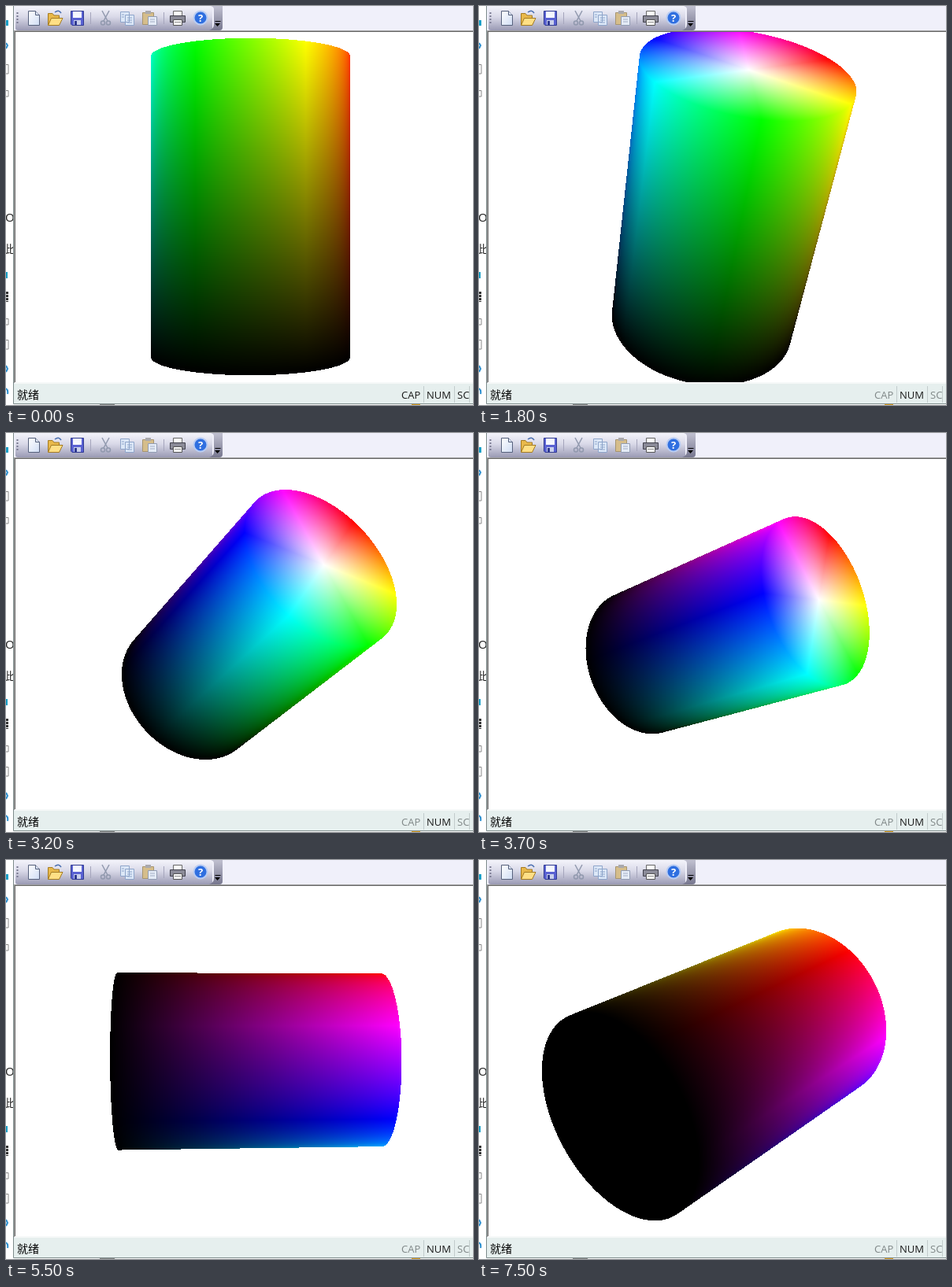
Recreate the animation shown at these times as an HTML page with a canvas. Size 593 by 507 pixels, loop 7.7 s.

```html
<!DOCTYPE html>
<html lang="zh">
<head>
<meta charset="utf-8">
<style>
  html, body { margin: 0; width: 100%; height: 100%; overflow: hidden; background: #fff; }
  svg, canvas { position: absolute; display: block; left: 0; top: 0; }
  canvas { left: 12px; top: 33px; }
  text { font: 13px "Open Sans", "Noto Sans CJK SC", "Noto Sans CJK", sans-serif; }
</style>
</head>
<body>
<svg width="593" height="507" viewBox="0 0 593 507">
  <defs>
    <linearGradient id="bar" x2="0" y2="1">
      <stop stop-color="#f4f4fb"/><stop offset=".45" stop-color="#d9d9e8"/><stop offset="1" stop-color="#9a9ab4"/>
    </linearGradient>
    <linearGradient id="end" x2="0" y2="1">
      <stop stop-color="#c0c0d0"/><stop offset="1" stop-color="#77778f"/>
    </linearGradient>
    <linearGradient id="page" x2="1" y2="1">
      <stop stop-color="#fff"/><stop offset="1" stop-color="#cfdcf4"/>
    </linearGradient>
  </defs>

  <!-- window behind, on the left -->
  <g fill="none" stroke="#8a8a8a">
    <path d="M-2 74.500H3V86H-2M-2 107.500H3V115H-2M-2 397.500H3V405H-2M-2 424.500H3V436H-2"/>
    <path d="M1.500 363V376" stroke="#333" stroke-width="3" stroke-dasharray="3 1"/>
    <path d="M0 47L2 50L0 54M0 457L2 461L0 465M0 486Q3 488 2 493" stroke="#2b8fd0" stroke-width="2"/>
  </g>
  <path d="M0 18H3V25H0ZM0 338H2V346H0Z" fill="#18a0c8"/>
  <text x="-1" y="274" style="font-size:15px" fill="#222">O</text>
  <text x="-3" y="314" style="font-size:14px" fill="#222">此</text>
  <path d="M119 506H138V507H119Z" fill="#888"/>
  <path d="M515 506H526V507H515Z" fill="#e0a020"/>

  <!-- window frame and toolbar -->
  <path d="M9 0H593V506H9Z" fill="#f0f0fa"/>
  <path d="M12 0H262V31H15Q12 31 12 28Z" fill="url(#bar)"/>
  <path d="M260 0H275V27Q275 31 271 31H258Q264 29 264 23V4Q264 1 260 0Z" fill="url(#end)"/>
  <path d="M265.500 19.500H272.500" stroke="#000"/>
  <path d="M265 22H272L268.500 26Z"/>
  <path d="M14.500 8V24" stroke="#77778f" stroke-width="2" stroke-dasharray="2 2"/>
  <path d="M107.500 8V23M200.500 8V23" stroke="#a5a5bc"/>

  <g>
    <path d="M28.500 6.500H37.500L42.500 11.500V24.500H28.500Z" fill="url(#page)" stroke="#56617c"/>
    <path d="M37.500 6.500V11.500H42.500" fill="#dce4f4" stroke="#56617c"/>
    <path d="M53.500 24V9.500H59L61 12H67.500V24Z" fill="#e9b94b" stroke="#a47b22"/>
    <path d="M53.500 24.500L57.500 15.500H72L67.500 24.500Z" fill="#ffdf85" stroke="#a47b22"/>
    <path d="M62 8Q67 4 70 9" fill="none" stroke="#4a6fb0" stroke-width="1.500"/>
    <path d="M82.500 6.500H98.500V24.500H84L82.500 23Z" fill="#5961d2" stroke="#303a91"/>
    <path d="M85 7H96V15H85Z" fill="#f5f7ff"/>
    <path d="M86 18H95V24H86Z" fill="#c9d0ec"/><path d="M87 19H90V24H87Z" fill="#303a91"/>
    <g fill="none" stroke="#9199ae" stroke-width="1.500">
      <path d="M122 6L129 19M131 6L124 19"/><circle cx="123" cy="21.500" r="2.500"/><circle cx="130" cy="21.500" r="2.500"/>
    </g>
    <path d="M145.500 7.500H156.500V20.500H145.500ZM151.500 11.500H162.500V24.500H151.500Z" fill="#dce7f7" stroke="#8ea5ca"/>
    <path d="M147 11H150M147 14H150M154 15H160M154 18H160M154 21H160" stroke="#8ea5ca"/>
    <path d="M173.500 8.500H187.500V23.500H173.500Z" fill="#d5bd8b" stroke="#a69570"/>
    <path d="M177 6H184V10H177Z" fill="#aaa9ad"/>
    <path d="M180.500 13.500H191.500V24.500H180.500Z" fill="#e4ebf6" stroke="#929db4"/>
    <path d="M183 17H189M183 20H189" stroke="#a3aec5"/>
    <path d="M212.500 6.500H223.500V13H212.500Z" fill="#fff" stroke="#666"/>
    <path d="M208.500 12.500H227.500V20.500H208.500Z" fill="#8b8b98" stroke="#40404c"/>
    <path d="M212.500 17.500H223.500V24.500H212.500Z" fill="#fff" stroke="#555"/>
    <path d="M214 20.500H222" stroke="#888"/>
    <circle cx="247" cy="15" r="8.500" fill="#2f6fe0" stroke="#b8ccf3" stroke-width="2"/>
  </g>
  <text x="247" y="20" text-anchor="middle" style="font-weight:700" fill="#fff">?</text>

  <!-- view and status bar -->
  <path d="M10 31H593V479H10Z" fill="#a0a0a0"/>
  <path d="M11 32H593V479H11Z" fill="#696969"/>
  <path d="M12 33H593V478H12Z" fill="#fff"/>
  <path d="M11 478H593V480H11Z" fill="#f6f8f8"/>
  <path d="M10 480H593V505H10Z" fill="#e6efee"/>
  <path d="M530.500 483V504M569.500 483V504M588.500 483V504" stroke="#c2cccc"/>
  <path d="M9.500 0V505.500H593" fill="none" stroke="#7d8b8b"/>
  <text x="14" y="499" style="font-size:14px">就绪</text>
  <g fill="#1a1a1a">
    <text class="key" x="502" y="499">CAP</text>
    <text x="534" y="499">NUM</text>
    <svg x="570" y="480" width="18" height="25"><text class="key" x="3" y="19">SC</text></svg>
  </g>
</svg>
<canvas width="581" height="445"></canvas>
<script>
const LOOP = 7700, FOCAL = 1037, HALF = 1.5, CX = 298.5, CY = 222, RAD = Math.PI / 180;
const canvas = document.querySelector('canvas'), ctx = canvas.getContext('2d');
const { width, height } = canvas;
const lockKeys = document.querySelectorAll('.key');

// Key poses: time, clockwise roll, tilt towards the viewer, camera distance, hue facing the viewer
const poses = [
  [200, 0, 0, 8.26, 90],
  [1800, 10.5, 32, 8.26, 130],
  [2500, 23.4, 43.5, 9.35, 150],
  [3700, 70.5, 39.8, 10.25, 225],
  [4500, 87.7, 21.5, 11.3, 252],
  [5500, 89.7, -4.3, 9.37, 279],
  [7500, 61.6, -42.8, 8.27, 337]
];

const dot = (a, b) => a[0] * b[0] + a[1] * b[1] + a[2] * b[2];
const unit = a => a.map(v => v / Math.hypot(...a));
const cross = (a, b) => [0, 1, 2].map(i => {
  const j = (i + 1) % 3, k = (i + 2) % 3;
  return a[j] * b[k] - a[k] * b[j];
});

// Smooth curve through the key poses, at rest at both ends.
function poseAt(time) {
  const last = poses.length - 1;
  const t = Math.min(poses[last][0], Math.max(poses[0][0], time));
  const i = Math.max(1, poses.findIndex(p => p[0] >= t));
  const a = poses[i - 1], b = poses[i], span = b[0] - a[0], s = (t - a[0]) / span;
  const slope = (j, n) => j === 0 || j === last ? 0
    : (poses[j + 1][n] - poses[j - 1][n]) / (poses[j + 1][0] - poses[j - 1][0]);
  const [roll, tilt, dist, hue] = [1, 2, 3, 4].map(n =>
    a[n] + (b[n] - a[n]) * s * s * (3 - 2 * s)
    + span * s * (1 - s) * (slope(i - 1, n) * (1 - s) - slope(i, n) * s));
  const flat = Math.cos(tilt * RAD);
  const axis = [Math.sin(roll * RAD) * flat, Math.cos(roll * RAD) * flat, Math.sin(tilt * RAD)];
  return { axis, dist, hue };
}

const channel = (hue, shift) => {
  const h = (((hue + shift) / 60) % 6 + 6) % 6;
  return Math.min(1, Math.max(0, Math.abs(h - 3) - 1));
};

// Casts one ray per pixel at the HSV cylinder.
function render({ axis, dist, hue }) {
  const image = ctx.createImageData(width, height), data = image.data;
  const front = unit([0, 1, 2].map(i => (i === 2) - axis[2] * axis[i]));
  const side = cross(axis, front);
  const eyeH = dist * axis[2], c = dist * dist - eyeH * eyeH - 1;

  for (let y = 0, i = 0; y < height; y++) {
    for (let x = 0; x < width; x++, i += 4) {
      const ray = [(x + .5 - CX) / FOCAL, (CY - y - .5) / FOCAL, -1];
      const k = dot(ray, axis), a = dot(ray, ray) - k * k, b = -dist - eyeH * k;
      const disc = b * b - a * c;
      if (disc < 0) continue;

      let t = (-b - Math.sqrt(disc)) / a, h = eyeH + t * k, sat = 1;
      const onCap = Math.abs(h) > HALF;
      if (onCap) {
        h = Math.sign(h) * HALF;
        t = (h - eyeH) / k;
      }
      const p = [ray[0] * t, ray[1] * t, dist - t];
      if (onCap) {
        sat = Math.sqrt(Math.max(0, dot(p, p) - h * h));
        if (t < 0 || sat > 1) continue;
      }
      const value = 255 * (h + HALF) / (2 * HALF);
      const angle = hue - Math.atan2(dot(p, side), dot(p, front)) / RAD;
      [0, 240, 120].forEach((shift, n) => {
        data[i + n] = value * (1 - sat + sat * channel(angle, shift));
      });
      data[i + 3] = 255;
    }
  }
  ctx.putImageData(image, 0, 0);
}

// The view is redrawn two times in every 300 ms: after 100 ms, then after 200 ms.
const stepAt = t => Math.floor(t / 300) * 300 + (t % 300 >= 100 ? 100 : 0);

let shown = -1;
const start = performance.now();
function tick() {
  const t = (performance.now() - start) % LOOP, step = stepAt(t);
  if (step !== shown) {
    shown = step;
    render(poseAt(step));
  }
  lockKeys.forEach(el => el.setAttribute('fill', t < 200 ? '#1a1a1a' : '#808888'));
  requestAnimationFrame(tick);
}
tick();
</script>
</body>
</html>
```
